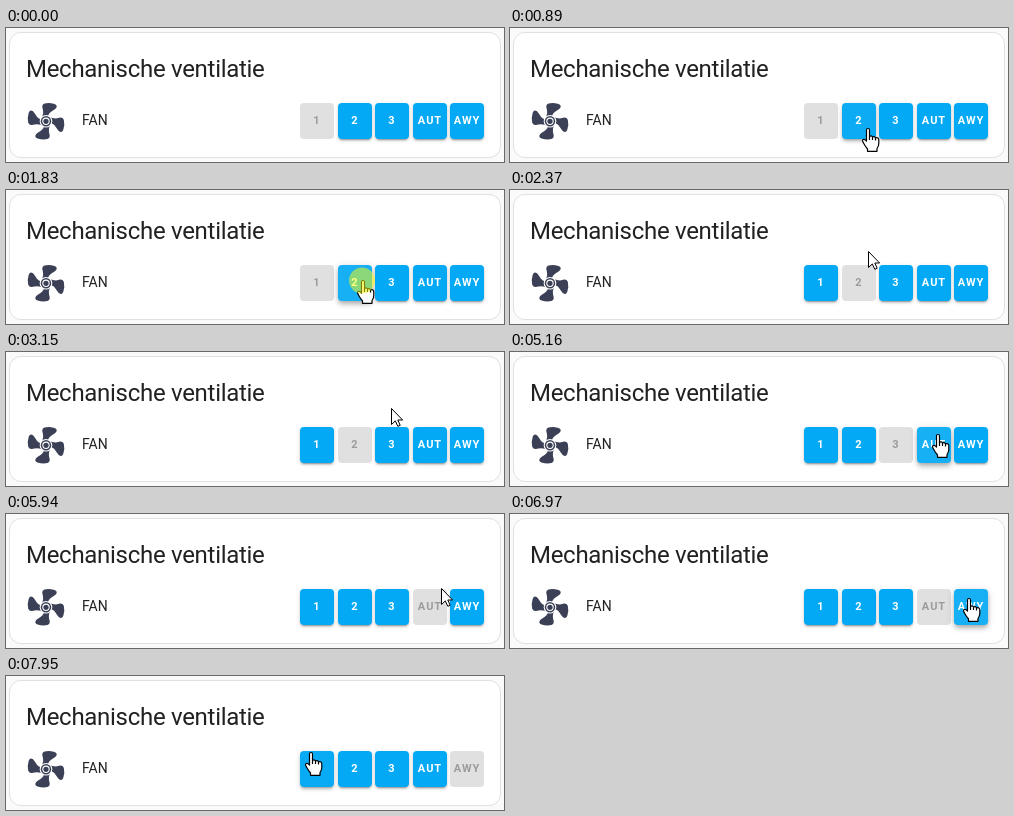
Animation of 498x134 px, one loop 8 s. Source, as an HTML page:

```html
<!DOCTYPE html>
<html lang="nl">
<head>
<meta charset="utf-8">
<style>
  html, body { margin: 0; width: 100%; height: 100%; overflow: hidden; background: #fafafa; }
  body { position: relative; font-family: Roboto, sans-serif; color: #212121; }
  body > * { position: absolute; box-sizing: border-box; }
  .card { left: 3px; top: 4px; width: 492px; height: 126px; background: #fff; border: 1px solid #e0e0e0; border-radius: 12px; }
  .title { left: 20px; top: 25px; font-size: 24px; line-height: 32px; letter-spacing: -.012em; white-space: nowrap; }
  .name { left: 76px; top: 82px; font-size: 14px; line-height: 20px; }
  .button { top: 75px; width: 34px; height: 36px; border-radius: 4px; text-align: center;
    font: bold 11px/36px Roboto, sans-serif; letter-spacing: .0893em; }
  svg { left: 0; top: 0; width: 498px; height: 134px; }
</style>
</head>
<body>
<div class="card"></div>
<div class="title">Mechanische ventilatie</div>
<div class="name">FAN</div>
<svg viewBox="0 0 498 134">
  <defs>
    <path id="blade" d="M2 -4C2 -9 7 -10 10 -13Q12 -16 8.500 -17.300Q3 -19 -1.500 -17.800Q-4.500 -16.500 -3.500 -13Q-2 -9 -4 -4Z"/>
  </defs>
  <g transform="translate(40 93.300)" fill="#3b4056">
    <use href="#blade"/>
    <use href="#blade" transform="rotate(90)"/>
    <use href="#blade" transform="rotate(180)"/>
    <use href="#blade" transform="rotate(270)"/>
    <circle r="6.300" fill="#fff"/>
    <circle r="5.200"/>
    <circle r="3.700" fill="#fff"/>
    <circle r="2.600"/>
  </g>
</svg>
<svg id="overlay" viewBox="0 0 498 134">
  <g id="pointer" fill="#fff" stroke="#000" stroke-linejoin="round">
    <path id="arrow" d="M.5 .5V16.500L4.300 12.900L6.800 18.300L9.200 17.300L6.800 12H11.600Z"/>
    <path id="hand" transform="translate(1)" stroke-width="1.200" d="M-1.500 13V2Q-1.500 .5 0 .5T1.500 2V8.500Q3.300 7 4.500 9Q6.500 8 7.500 9.800Q10.800 9 10.800 12V15.500Q10.800 18 9 20.500V23.300H-.5V21Q-3 18 -4.500 15Q-6.300 12 -4.800 11.500Q-3.300 11 -1.500 13ZM1.500 8.500V12M4.500 9V12M7.500 9.800V12.500"/>
    <circle id="press" r="13" cy=".5" fill="#ff0" fill-opacity=".5" stroke="none"/>
  </g>
</svg>
<script>
const LOOP = 8000, TICK = 70, RESPONSE = 340, PRESS = 140, ENTER = 610;
const labels = ['1', '2', '3', 'AUT', 'AWY'];
const clicks = [1830, 3840, 5380, 6760];

// Each move travels to (x, y), rising by lift on the way.
const origin = { x: 360, y: 128 };
const moves = [
  { start: ENTER, end: 1030, x: 356, y: 90, lift: 0 },
  { start: 2150, end: 3500, x: 393, y: 82, lift: 43 },
  { start: 4150, end: 5160, x: 427, y: 84, lift: 15 },
  { start: 5720, end: 6360, x: 458, y: 84, lift: 10 },
  { start: 7080, end: 7530, x: 299, y: 42, lift: 26 },
  { start: 7600, end: 7950, x: 304, y: 76, lift: 0 }
];

const overlay = document.getElementById('overlay');
const [pointer, press, arrow, hand] = ['pointer', 'press', 'arrow', 'hand'].map(id => document.getElementById(id));
const buttonX = i => Math.round(294 + 37.5 * i);
const mix = (a, b, k) => a + (b - a) * k;
const clamp = k => Math.min(1, Math.max(0, k));
const smooth = k => k * k * (3 - 2 * k);
const show = (el, visible) => el.style.display = visible ? '' : 'none';

const buttons = labels.map((label, i) => {
  const el = document.createElement('div');
  el.className = 'button';
  el.textContent = label;
  el.style.left = buttonX(i) + 'px';
  document.body.insertBefore(el, overlay);
  return el;
});

// The picture advances in ticks counted from the entrance or the latest click.
function snap(t) {
  const start = [ENTER, ...clicks].filter(s => s <= t).pop() ?? 0;
  return start + Math.floor((t - start) / TICK) * TICK;
}

function position(t) {
  if (t < ENTER) return null;
  let { x, y } = origin;
  for (const m of moves) {
    const k = clamp((t - m.start) / (m.end - m.start));
    x = mix(x, m.x, smooth(k));
    y = mix(y, m.y, smooth(k)) - m.lift * Math.sin(Math.PI * k ** .7);
  }
  return [Math.round(x), Math.round(y)];
}

const activeAt = t => clicks.filter(c => c + RESPONSE <= t).length;

function hoveredAt(t) {
  const p = position(t);
  if (!p || p[1] < 75 || p[1] >= 111) return -1;
  const i = labels.findIndex((_, n) => p[0] >= buttonX(n) && p[0] < buttonX(n) + 34);
  return i === activeAt(t) ? -1 : i;
}

// Share of the last 240 ms spent over a button gives its fade.
function hoverAmount(i, t) {
  let hits = 0;
  for (let n = 0; n < 8; n++) if (hoveredAt(t - n * 30) === i) hits++;
  return hits / 8;
}

function drawButton(el, i, t) {
  if (i === activeAt(t)) {
    Object.assign(el.style, { background: '#e0e0e0', color: '#9b9b9b', boxShadow: 'none' });
    return;
  }
  const h = hoverAmount(i, t);
  const layer = (y, blur, spread, alpha) => `0 ${y}px ${blur}px ${spread}px rgba(0,0,0,${alpha})`;
  el.style.color = '#fff';
  el.style.background = `linear-gradient(rgba(255,255,255,${h * .08}) 0 0), #03a9f4`;
  el.style.boxShadow = [
    layer(mix(3, 2, h), mix(1, 4, h), mix(-2, -1, h), .2),
    layer(mix(2, 4, h), mix(2, 5, h), 0, .14),
    layer(1, mix(5, 10, h), 0, .12)
  ].join();
}

function draw(time) {
  const t = snap(time);
  buttons.forEach((el, i) => drawButton(el, i, t));
  const p = position(t);
  show(pointer, p);
  if (!p) return;
  const over = hoveredAt(t) >= 0;
  pointer.setAttribute('transform', `translate(${p})`);
  show(hand, over);
  show(arrow, !over);
  show(press, clicks.some(c => t >= c && t < c + PRESS));
}

function frame() {
  draw(performance.now() % LOOP);
  requestAnimationFrame(frame);
}
frame();
</script>
</body>
</html>
```
